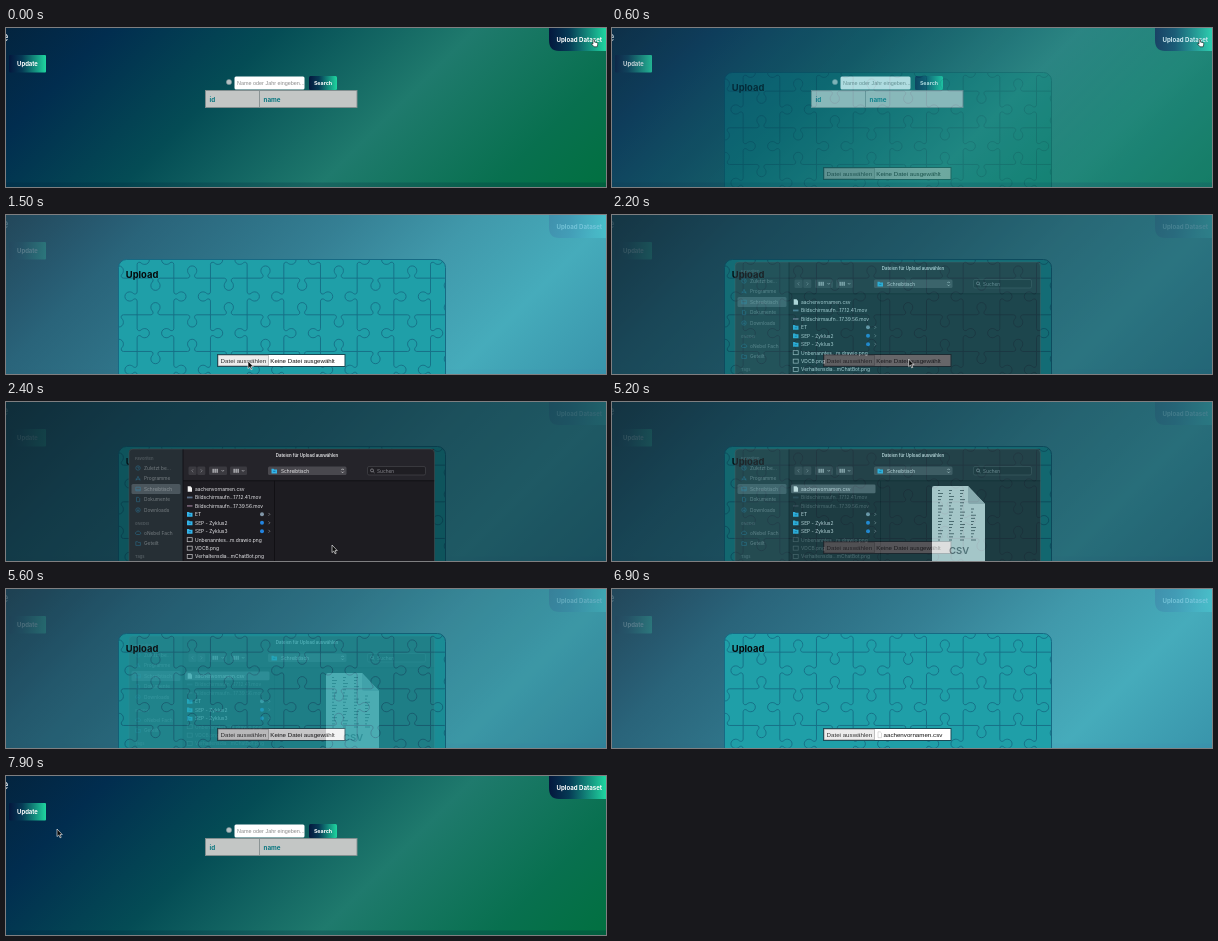
Write an HTML page that moves like this. It is 600x159 px and loops after 8 s.

```html
<!DOCTYPE html>
<html lang="de">
<head>
<meta charset="utf-8">
<title>Upload</title>
<style>
html, body { margin: 0; width: 100%; height: 100%; overflow: hidden; background: #01304f; }
svg { display: block; width: 100vw; height: 100vh; }
text { font-family: Inter, "Open Sans", sans-serif; }
.form text { font-family: "Liberation Sans", Arial, sans-serif; }
</style>
</head>
<body>
<svg id="stage" viewBox="0 0 600 159" preserveAspectRatio="none"></svg>
<script>
const LOOP = 8000;

const rect = (x, y, w, h, fill, more = '') =>
  `<rect x="${x}" y="${y}" width="${w}" height="${h}" fill="${fill}" ${more}/>`;
const text = (x, y, size, fill, str, more = '') =>
  `<text x="${x}" y="${y}" font-size="${size}" fill="${fill}" ${more}>${str}</text>`;
const path = (d, stroke, more = '') =>
  `<path d="${d}" fill="none" stroke="${stroke}" ${more}/>`;
const group = (id, body, more = '') => `<g id="${id}" ${more}>${body}</g>`;
const bold = 'font-weight="700"';

// 135deg page gradient across the whole stage
const diagonal = (id, stops) =>
  `<linearGradient id="${id}" gradientUnits="userSpaceOnUse" x1="110.25" y1="-110.25" x2="489.75" y2="269.25">` +
  stops.map(([at, color]) => `<stop offset="${at}" stop-color="${color}"/>`).join('') + '</linearGradient>';

const defs = `<defs>
  ${diagonal('pageBg', [[0, '#03243f'], [.14, '#012d4f'], [.36, '#044c55'], [.62, '#1f7a6d'], [.85, '#08704f'], [1, '#017040']])}
  ${diagonal('veilBg', [[0, '#2a4f60'], [.2, '#336f84'], [.45, '#3e87a0'], [.8, '#53b9d3'], [1, '#469dc4']])}
  <linearGradient id="btn"><stop offset="0" stop-color="#04173d"/><stop offset=".35" stop-color="#063a55"/>
    <stop offset="1" stop-color="#1fd6a0"/></linearGradient>
  <clipPath id="modalClip"><rect x="112.5" y="44.5" width="327" height="140" rx="8"/></clipPath>
  <clipPath id="inputClip"><rect x="229" y="48" width="69" height="14"/></clipPath>
</defs>`;

function page() {
  return rect(0, 0, 600, 159, 'url(#pageBg)') +
    rect(0, 154.5, 600, 5, '#00203a', 'opacity=".22"') +
    text(-4, 13, 11, '#fff', 'e') +
    rect(3, 27, 37, 17.5, 'url(#btn)', 'rx="1"') +
    text(21.5, 38.2, 5.9, '#fff', 'Update', bold + ' text-anchor="middle"') +
    '<path d="M543 0H600V23H553Q543 23 543 12Z" fill="url(#btn)"/>' +
    text(550.5, 14.2, 6.1, '#fff', 'Upload Dataset', bold) +
    '<circle cx="223" cy="54" r="2.6" fill="#b3bfc2" stroke="#7d9297" stroke-width=".5"/>' +
    rect(228.5, 48.5, 70, 13, '#fff', 'rx="1.5"') +
    `<g class="form" clip-path="url(#inputClip)">${text(231, 57.2, 5.45, '#8b8b8b', 'Name oder Jahr eingeben...')}</g>` +
    rect(303, 48, 28, 14, 'url(#btn)', 'rx="1.5"') +
    text(317, 57, 5.3, '#fff', 'Search', bold + ' text-anchor="middle"') +
    rect(199.5, 62.5, 151.5, 17, '#c3c6c5', 'stroke="#858f90" stroke-width=".9"') +
    path('M253.5 62.5V79.5', '#858f90', 'stroke-width=".9"') +
    text(203.5, 73.5, 6.3, '#0b7780', 'id', bold) +
    text(257.5, 73.5, 6.3, '#0b7780', 'name', bold);
}

function puzzle() {
  const edge = 'M0 0H36C42 0 43-7 40-10C37-13 36-16 36-20A12 12 0 0 1 60-20C60-16 59-13 56-10C53-7 54 0 60 0H96';
  let out = '';
  for (let j = 0; j < 4; j++) {
    for (let i = 0; i < 10; i++) {
      const dir = (i + j) % 2 ? -1 : 1;
      const near = 96 * i - 48, top = 96 * j - 48;
      out += `<path d="${edge}" transform="translate(${near} ${top + 96}) scale(1 ${dir})"/>`;
      out += `<path d="${edge}" transform="translate(${near + 96} ${top}) rotate(90) scale(1 ${dir})"/>`;
    }
  }
  return `<g clip-path="url(#modalClip)"><g transform="translate(112.8 44.8) scale(.382)"
    fill="none" stroke="#166c84" stroke-width="2.3">${out}</g></g>`;
}

function modal() {
  const docIcon = '<path d="M266 142.8h2.2l1.3 1.3v4.6h-3.5z" fill="#fff" stroke="#aaa" stroke-width=".4"/>';
  return rect(112.5, 44.5, 327, 140, '#1f9fa8', 'rx="8"') + puzzle() +
    rect(112.5, 44.5, 327, 140, 'none', 'rx="8" stroke="#176a84"') +
    text(119.8, 63, 9.4, '#05090b', 'Upload', bold) +
    '<g class="form">' +
    rect(211.5, 139.5, 127.5, 12, '#fff', 'stroke="#1b4b57"') +
    rect(212.2, 140.2, 50.3, 10.6, '#ececec', 'stroke="#8c8c8c" stroke-width=".5"') +
    text(214.5, 147.7, 6.2, '#333', 'Datei auswählen') +
    group('noFile', text(264.3, 147.7, 6.15, '#111', 'Keine Datei ausgewählt')) +
    group('hasFile', docIcon + text(271.5, 147.7, 6.2, '#111', 'aachenvornamen.csv')) + '</g>';
}

const folder = (x, y) =>
  `<path d="M${x} ${y - 2.3}h2l.7.8h2.8v4h-5.5z" fill="#35b4e8"/>` + rect(x + 1.7, y - .2, 2.2, 1.2, '#1580b8');

function sidebar() {
  const items = [['Zuletzt be…', 66], ['Programme', 76.5], ['Schreibtisch', 87], ['Dokumente', 97.5],
    ['Downloads', 108], ['oNebel Fach', 131], ['Geteilt', 141.5]];
  const heads = [['Favoriten', 56.5], ['oNebel', 121.5], ['Tags', 154.5]];
  const icon = (y, i) => [
    `<circle cx="132" cy="${y}" r="2.2"/><path d="M132 ${y - 1.3}v1.4h1"/>`,
    `<path d="M130 ${y + 2}L132 ${y - 2.2}L134 ${y + 2}M129.6 ${y + .7}h4.8"/>`,
    `<path d="M129.8 ${y - 1.8}h4.5v3.6h-4.5zM129.8 ${y + .8}h4.5"/>`,
    `<path d="M130.5 ${y - 2.2}h2l1.2 1.2v3.2h-3.2z"/>`,
    `<circle cx="132" cy="${y}" r="2.2"/><path d="M132 ${y - 1.2}v2.3m-.9-.9l.9.9l.9-.9"/>`,
    `<path d="M130.3 ${y + 1.5}a1.3 1.3 0 0 1 .2-2.5a1.8 1.8 0 0 1 3.2 0a1.3 1.3 0 0 1 .2 2.5z"/>`,
    `<path d="M129.8 ${y - 1.8}h1.8l.6.7h2.2v3h-4.6z"/>`][i];
  return heads.map(([s, y]) => text(129, y + 1.2, 4.1, '#8d979c', s, 'font-weight="600"')).join('') +
    items.map(([s, y], i) => `<g fill="none" stroke="#2fa6dc" stroke-width=".7">${icon(y, i)}</g>` +
      text(138, y + 1.8, 4.8, '#e4e9eb', s)).join('');
}

function toolbar() {
  const grey = '#3b3a40';
  const grid = (x) => [0, 2, 4].map(d => rect(x + d, 66.8, 1.3, 4, '#b9b9bd')).join('');
  return text(301, 55.4, 4.3, '#e6e6e8', 'Dateien für Upload auswählen', 'font-weight="600" text-anchor="middle"') +
    rect(182.5, 64.5, 8, 8.5, grey, 'rx="1.3"') + rect(191.3, 64.5, 8, 8.5, grey, 'rx="1.3"') +
    path('M187.3 67.2l-1.6 1.6l1.6 1.6M194.6 67.2l1.6 1.6l-1.6 1.6', '#85858a', 'stroke-width=".7"') +
    rect(203, 64.5, 18, 8.5, grey, 'rx="1.3"') + rect(224, 64.5, 17, 8.5, grey, 'rx="1.3"') +
    grid(206.5) + grid(227.5) +
    path('M215.5 68l1.3 1.4l1.3-1.4M235.8 68l1.3 1.4l1.3-1.4', '#b9b9bd', 'stroke-width=".7"') +
    rect(262, 64.5, 78.5, 8.5, '#49484e', 'rx="1.5"') + folder(265.5, 69) +
    text(275, 70.5, 4.8, '#f0f0f2', 'Schreibtisch') +
    group('chevronBox', rect(333.2, 65, 6.8, 7.5, '#1769d2', 'rx="1.2"')) +
    path('M335.4 68l1.2-1.2l1.2 1.2M335.4 69.6l1.2 1.2l1.2-1.2', '#f0f0f2', 'stroke-width=".6"') +
    rect(361.5, 64.5, 58, 8.5, '#1f1e23', 'rx="1.5" stroke="#4b4a50" stroke-width=".6"') +
    '<circle cx="366" cy="68.4" r="1.5" fill="none" stroke="#a5a5aa" stroke-width=".6"/>' +
    path('M367.1 69.5l1.4 1.4', '#a5a5aa', 'stroke-width=".6"') +
    text(371, 70.5, 4.8, '#8a8a90', 'Suchen');
}

function fileList() {
  const rows = ['aachenvornamen.csv', 'Bildschirmaufn…17.12.41.mov', 'Bildschirmaufn…17.39.56.mov', 'ET',
    'SEP - Zyklus2', 'SEP - Zyklus3', 'Unbenanntes…m.drawio.png', 'VDCB.png', 'Verhaltensdia…mChatBot.png'];
  const kept = { files: '', dirs: '' };
  rows.forEach((name, i) => {
    const y = 87 + i * 8.45;
    const dir = i > 2 && i < 6;
    let icon;
    if (dir) {
      icon = folder(181, y) + path(`M262.5 ${y - 1.4}l1.4 1.4l-1.4 1.4`, '#a0a0a5', 'stroke-width=".6"') +
        `<circle cx="256" cy="${y}" r="2" fill="${i === 3 ? '#8297a8' : '#2384e0'}"/>`;
    } else if (i === 0) {
      icon = `<path d="M181.7 ${y - 2.8}h2.8l1.5 1.5v4.1h-4.3z" fill="#f2f2f2"/>`;
    } else if (i < 3) {
      icon = rect(181, y - .9, 5.5, 1.8, i === 1 ? '#596e86' : '#6f5d6f');
    } else {
      icon = rect(181.2, y - 2, 5, 4, '#1a1a1f', 'stroke="#c9c9cc" stroke-width=".7"');
    }
    kept[dir || i === 0 ? 'dirs' : 'files'] += icon + text(189, y + 1.8, 4.9, '#e9e9ec', name);
  });
  return group('pick', rect(179, 82.5, 84.5, 8.8, '#5a5a60', 'rx="1.3"')) + kept.dirs + group('files', kept.files);
}

function preview() {
  let lines = '';
  for (let r = 0; r < 17; r++) {
    for (let c = 0; c < 4; c++) {
      const w = 2 + (r * 7 + c * 5) % 4;
      if (r > 5 || c < 3) lines += rect(326 + c * 11, 88 + r * 3.1, w, .8, '#44484b');
    }
  }
  return '<path d="M322 84H356L373 102V160H320V86Q320 84 322 84Z" fill="#f1f3f3"/>' +
    '<path d="M356 84V100Q356 102 358 102H373Z" fill="#c3c8ca"/>' + lines +
    text(347, 152, 9.5, '#6d7376', 'CSV', 'font-weight="600" text-anchor="middle"');
}

function dialog() {
  return rect(0, 0, 600, 159, '#001a20', 'opacity=".56"') +
    rect(123, 47, 305.5, 130, '#1d1c21', 'rx="4"') +
    '<path d="M177 47H127Q123 47 123 51V159H177Z" fill="#262f35"/>' +
    rect(177, 47, 251, 31.5, '#25242a') +
    path('M177 78.8H428.5M268.5 78.8V159M177 47V159', '#0f0f12', 'stroke-width=".8"') +
    rect(123, 47, 305.5, 130, 'none', 'rx="4" stroke="#4a5257" stroke-width=".5"') +
    rect(125.5, 82, 49, 10, '#4b565d', 'rx="1.5"') +
    group('side', sidebar()) + toolbar() + fileList() + group('preview', preview());
}

const pointer =
  group('arrow', '<path d="M0 0V7.6L1.8 6L3 8.8L4.2 8.3L3 5.6H5.3Z" fill="#0a0a0a" stroke="#fff" stroke-width=".6"/>') +
  group('hand', '<path d="M1 0.6Q1.8 0 2.4 .8V3L5.2 3.7Q6 4 5.8 5L5.2 7.8H2L-.6 4.8Q0 4 1 4.8Z" fill="#fff" stroke="#111" stroke-width=".6"/>');

const stage = document.getElementById('stage');
stage.innerHTML = defs + page() +
  group('veil', rect(0, 0, 600, 159, 'url(#veilBg)', 'opacity=".81"') + modal()) +
  group('dialog', dialog()) +
  '<circle id="ring" cx="224.5" cy="88" r="7.5" fill="#fff" fill-opacity=".08" stroke="#b9bcc0" stroke-width=".9"/>' +
  group('cursor', pointer);

const el = {};
stage.querySelectorAll('g[id], circle[id]').forEach(n => el[n.id] = n);

const clamp = v => Math.min(1, Math.max(0, v));
const ramp = (t, a, b) => clamp((t - a) / (b - a));
const ease = k => k * k * (3 - 2 * k);
const show = (id, k) => {
  el[id].style.opacity = k;
  el[id].style.display = k > 0 ? '' : 'none';
};

// time, x, y of the pointer tip
const route = [[0, 586, 11], [700, 586, 11], [1400, 242, 146], [1900, 242, 146], [2400, 326, 143],
  [2800, 326, 143], [3500, 224.5, 87], [4100, 224.5, 87], [4600, 345, 170], [6999, 176, 170],
  [7000, 175, 66], [7350, 175, 66], [7500, 175.6, 66], [7600, 175.6, 66], [7900, 51, 53], [8000, 51, 53]];

function pointerAt(t) {
  const n = Math.max(1, route.findIndex(p => p[0] > t));
  const [t0, x0, y0] = route[n - 1], [t1, x1, y1] = route[n];
  const k = ease(ramp(t, t0, t1));
  return [x0 + (x1 - x0) * k, y0 + (y1 - y0) * k];
}

function draw(t) {
  show('veil', t < 7000 ? ramp(t, 300, 1150) : 0);
  show('noFile', t < 5700 ? 1 : 0);
  show('hasFile', t < 5700 ? 0 : 1);

  const active = ramp(t, 2400, 3000) * (1 - ramp(t, 4800, 5150));
  show('dialog', ramp(t, 1900, 2350) * (1 - ramp(t, 5000, 5800)));
  show('side', .42 + .58 * active);
  show('chevronBox', active);
  show('pick', t >= 4000 ? 1 : 0);
  show('files', 1 - .68 * ramp(t, 4800, 5150));
  show('preview', .85 * ramp(t, 4200, 4500));

  show('ring', ramp(t, 3550, 3650) * (1 - ramp(t, 3800, 3950)));
  const [x, y] = pointerAt(t);
  el.cursor.setAttribute('transform', `translate(${x} ${y})`);
  const overLink = t < 800;
  show('hand', overLink ? 1 : 0);
  show('arrow', overLink ? 0 : 1);
}

const start = performance.now();
function tick() {
  draw((performance.now() - start) % LOOP);
  requestAnimationFrame(tick);
}
draw(0);
requestAnimationFrame(tick);
</script>
</body>
</html>
```
